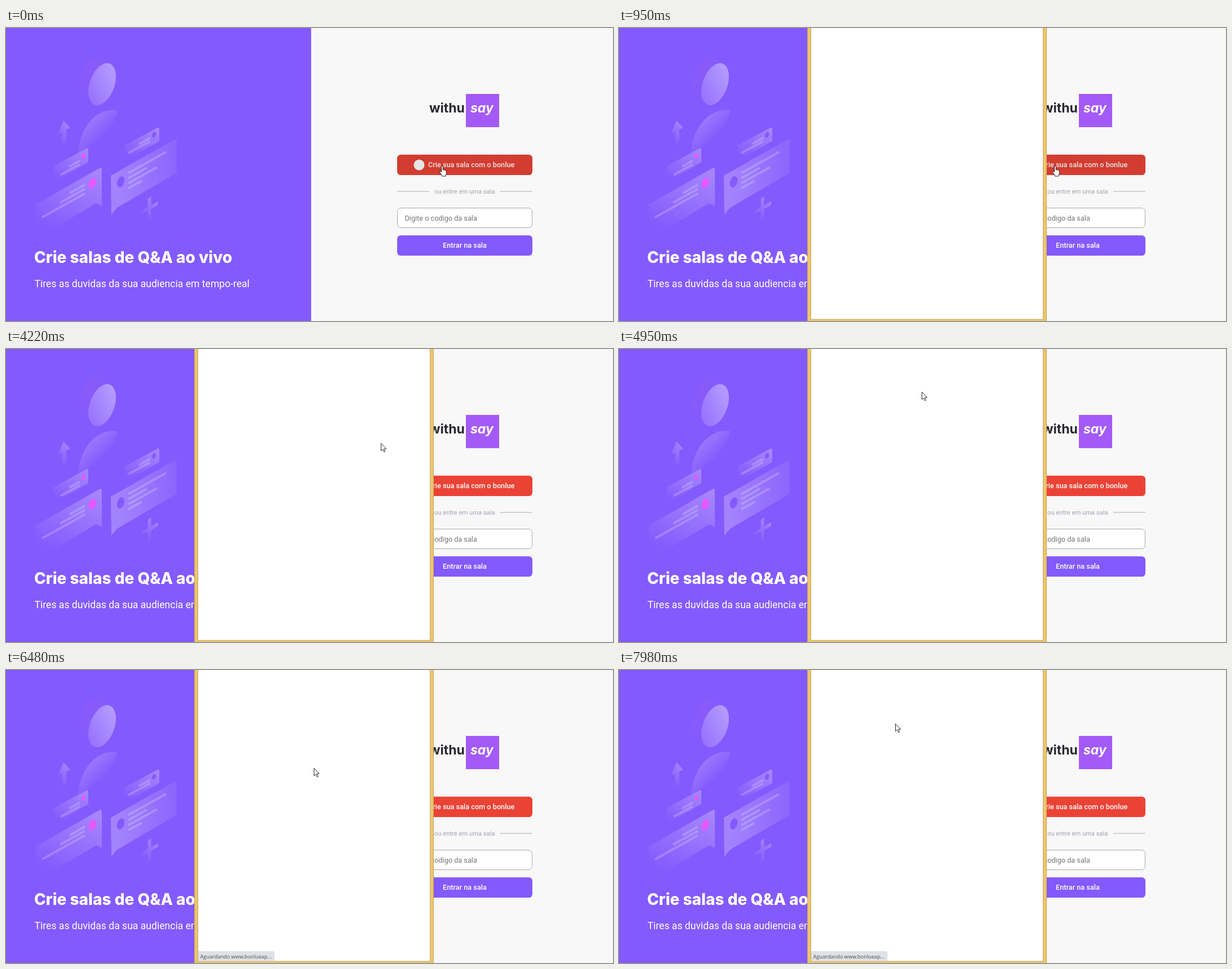
An HTML page that plays this animation: 1077 px wide and 520 px high, repeating every 8000 ms.

```html
<!DOCTYPE html>
<html lang="pt-BR">
<head>
<meta charset="utf-8">
<title>Salas ao vivo</title>
<style>
  html, body { margin: 0; width: 100%; height: 100%; overflow: hidden; background: #f8f8f8; }
  svg { display: block; width: 1077px; height: 520px; }
  text { font-family: Roboto, sans-serif; white-space: pre; }
  .bold { font-family: Inter, sans-serif; font-weight: 700; }
  .heavy { font-weight: 800; }
  .label { font-size: 12.7px; font-weight: 500; }
  .bars { fill: none; stroke: #fff; stroke-opacity: .2; stroke-width: 4; }
  .cursor { fill: #fff; stroke: #111; stroke-width: .9; stroke-linejoin: round; }
  .hover { filter: brightness(.9); }
</style>
</head>
<body>
<svg viewBox="0 0 1077 520">
  <defs>
    <linearGradient id="fade" x1=".8" y1="0" x2=".3" y2="1">
      <stop stop-color="#fff" stop-opacity=".27"/>
      <stop offset="1" stop-color="#fff" stop-opacity="0"/>
    </linearGradient>
    <linearGradient id="fadeRight" x1=".1" y1=".45" x2="1" y2=".4">
      <stop stop-color="#fff" stop-opacity=".25"/>
      <stop offset="1" stop-color="#fff" stop-opacity=".07"/>
    </linearGradient>
    <linearGradient id="head" x1=".8" y1="0" x2=".25" y2="1">
      <stop stop-color="#b7a0ff"/>
      <stop offset="1" stop-color="#9470ff"/>
    </linearGradient>
    <linearGradient id="body" x1=".25" y1=".2" x2=".65" y2=".65">
      <stop stop-color="#fff" stop-opacity=".2"/>
      <stop offset="1" stop-color="#fff" stop-opacity="0"/>
    </linearGradient>
    <linearGradient id="halo" x1="0" y1=".3" x2="1" y2=".7">
      <stop stop-color="#9a5cf0" stop-opacity=".4"/>
      <stop offset="1" stop-color="#835afd" stop-opacity="0"/>
    </linearGradient>
  </defs>

  <rect width="1077" height="520" fill="#f8f8f8"/>
  <rect width="541.400" height="520" fill="#835afd"/>

  <g id="art">
    <ellipse cx="156" cy="89" rx="21.900" ry="39" transform="rotate(20 156 89)" fill="url(#halo)"/>
    <ellipse cx="170.500" cy="99.700" rx="21.900" ry="39" transform="rotate(20 170.500 99.700)" fill="url(#head)"/>
    <path d="M128 222C130 178 160 140 198 146C192 178 158 204 140 215Z" fill="url(#body)"/>
    <path d="M102 164L114 177 107 180V203L99 208V184L92 188Z" fill="url(#fade)"/>

    <path d="M85 245L143 213.500Q146 212 146 216V238L85 274Z" fill="url(#fade)"/>
    <path class="bars" d="M112 246L131 235.500M97 260.500L131 242"/>
    <ellipse cx="137.500" cy="227.500" rx="2.900" ry="4.800" transform="rotate(18 137.500 227.500)" fill="#e559f9"/>

    <path d="M53 313L166 248.500Q170 246.500 170 251V316L160 311 85 356 53 362Z" fill="url(#fade)"/>
    <path class="bars" d="M113 293.500L140 278M96 310L140 285.500M64 336L140 293.500"/>
    <ellipse cx="153.300" cy="275.300" rx="6" ry="10.300" transform="rotate(18 153.300 275.300)" fill="#e559f9"/>

    <path d="M211 208L269 176.800Q272 175.500 272 179V201L211 235Z" fill="url(#fade)"/>
    <path class="bars" d="M236 206L256 195M217 222L256 201"/>
    <ellipse cx="262.700" cy="189.500" rx="3.300" ry="5.300" transform="rotate(18 262.700 189.500)" fill="#835afd"/>

    <path d="M186 262L299 198Q303 196 303 201V257L197 319 187 331Z" fill="url(#fadeRight)"/>
    <path class="bars" d="M217 257.500L284 220M217 266.500L250 248M217 275.500L268 247M217 284.500L241 271"/>
    <ellipse cx="203.500" cy="273" rx="6.200" ry="10.200" transform="rotate(18 203.500 273)" fill="#835afd"/>

    <path d="M251.500 303L257.500 299V314.500L270 307.500V314L257.500 321V338L251.500 342V324.500L240 331V324.500L251.500 318Z" fill="url(#fade)"/>
  </g>

  <g fill="#fff">
    <text class="bold heavy" x="50" y="416.500" font-size="28">Crie salas de Q&amp;A ao vivo</text>
    <text x="50.500" y="460" font-size="17.600">Tires as duvidas da sua audiencia em tempo-real</text>
  </g>

  <rect x="816" y="117" width="59" height="59" fill="#a45af6"/>
  <g font-size="23">
    <text class="bold" x="751" y="149.500" fill="#29292e">withu</text>
    <text class="bold" x="824" y="149.500" fill="#fff" font-style="italic">say</text>
  </g>

  <g id="create">
    <rect x="694" y="224.700" width="240" height="36.400" rx="6.400" fill="#ea4335"/>
    <circle cx="733" cy="243" r="9.500" fill="#fff"/>
    <text class="label" x="749" y="247.300" fill="#fff">Crie sua sala com o bonlue</text>
  </g>

  <path d="M694 290H751M877 290H934" stroke="#a8a8b3"/>
  <text x="760" y="294" font-size="11.200" fill="#a0a0b2">ou entre em uma sala</text>
  <rect x="694.500" y="319.500" width="239" height="35" rx="6.400" fill="#fff" stroke="#a8a8b3"/>
  <text x="707.500" y="341.700" font-size="12.700" fill="#757575">Digite o codigo da sala</text>
  <rect x="694" y="368" width="240" height="36" rx="6.400" fill="#835afd"/>
  <text class="label" x="814" y="390.300" fill="#fff" text-anchor="middle">Entrar na sala</text>

  <g id="popup">
    <rect x="334" width="425" height="520" fill="#ecc56d"/>
    <path d="M334.500 0V520M758.500 0V520" stroke="#c9a65a"/>
    <rect x="340.500" y="-2" width="412" height="519" fill="#fff" stroke="#c4a869"/>
  </g>
  <g id="status">
    <path d="M341 499H473Q476.500 499 476.500 502.500V516.500H341Z" fill="#dee1e6"/>
    <text x="344.500" y="512" style="font-family:'Open Sans',sans-serif" font-size="9.200" fill="#4a4d52">Aguardando www.bonlueap...</text>
  </g>

  <g id="pointer">
    <path id="hand" class="cursor" transform="translate(-4.500 .5)" d="M4 11V1.800Q4 .5 5.400 .5T6.800 1.800V7Q8.400 6.400 9 7.600 10.400 7 11 8.300 12.800 7.800 13 9.600V13Q13 15 11.600 16.500V18.500H5.200V17Q3 14.500 1 11.500 .2 10 1.400 9.600 2.600 9.300 4 11.200Z"/>
    <path id="arrow" class="cursor" transform="translate(.5 .5)" d="M0 0V13.300L3.100 10.400 5.200 15.200 7.300 14.300 5.200 9.600H9.300Z"/>
  </g>
</svg>

<script>
  const LOOP = 8000, POPUP_AT = 950, STATUS_AT = 6000, POPUP_EDGE = 759;
  const START = [773, 244];

  // first step ms, last step ms, steps, end x, end y
  const MOVES = [
    [2120, 2530, 7, 668, 169],
    [4220, 4950, 11, 537, 76],
    [5480, 5640, 3, 537, 102],
    [5860, 6080, 4, 542, 147],
    [6270, 6330, 2, 546, 165],
    [6480, 6480, 1, 546, 174],
    [6560, 6800, 4, 541, 198],
    [6880, 7210, 5, 524, 179],
    [7330, 7830, 6, 493, 106],
    [7980, 7980, 1, 490, 95]
  ];

  const $ = id => document.getElementById(id);
  const [create, popup, status, pointer, hand, arrow] =
    ['create', 'popup', 'status', 'pointer', 'hand', 'arrow'].map($);
  const show = (el, on) => { el.style.display = on ? '' : 'none'; };
  const ease = p => (1 - Math.cos(Math.PI * p)) / 2;

  function cursorAt(t) {
    let [x, y] = START;
    for (const [from, to, steps, endX, endY] of MOVES) {
      if (t < from) break;
      const done = t >= to ? steps : 1 + Math.floor((t - from) / (to - from) * (steps - 1));
      const p = ease(done / steps);
      x += (endX - x) * p;
      y += (endY - y) * p;
    }
    return [Math.round(x), Math.round(y)];
  }

  function draw(t) {
    const [x, y] = cursorAt(t);
    const onButton = x > POPUP_EDGE;
    pointer.setAttribute('transform', `translate(${x} ${y})`);
    show(hand, onButton);
    show(arrow, !onButton);
    create.classList.toggle('hover', onButton);
    show(popup, t >= POPUP_AT);
    show(status, t >= STATUS_AT);
  }

  const begin = performance.now();
  function tick() {
    draw((performance.now() - begin) % LOOP);
    requestAnimationFrame(tick);
  }
  tick();
</script>
</body>
</html>
```
